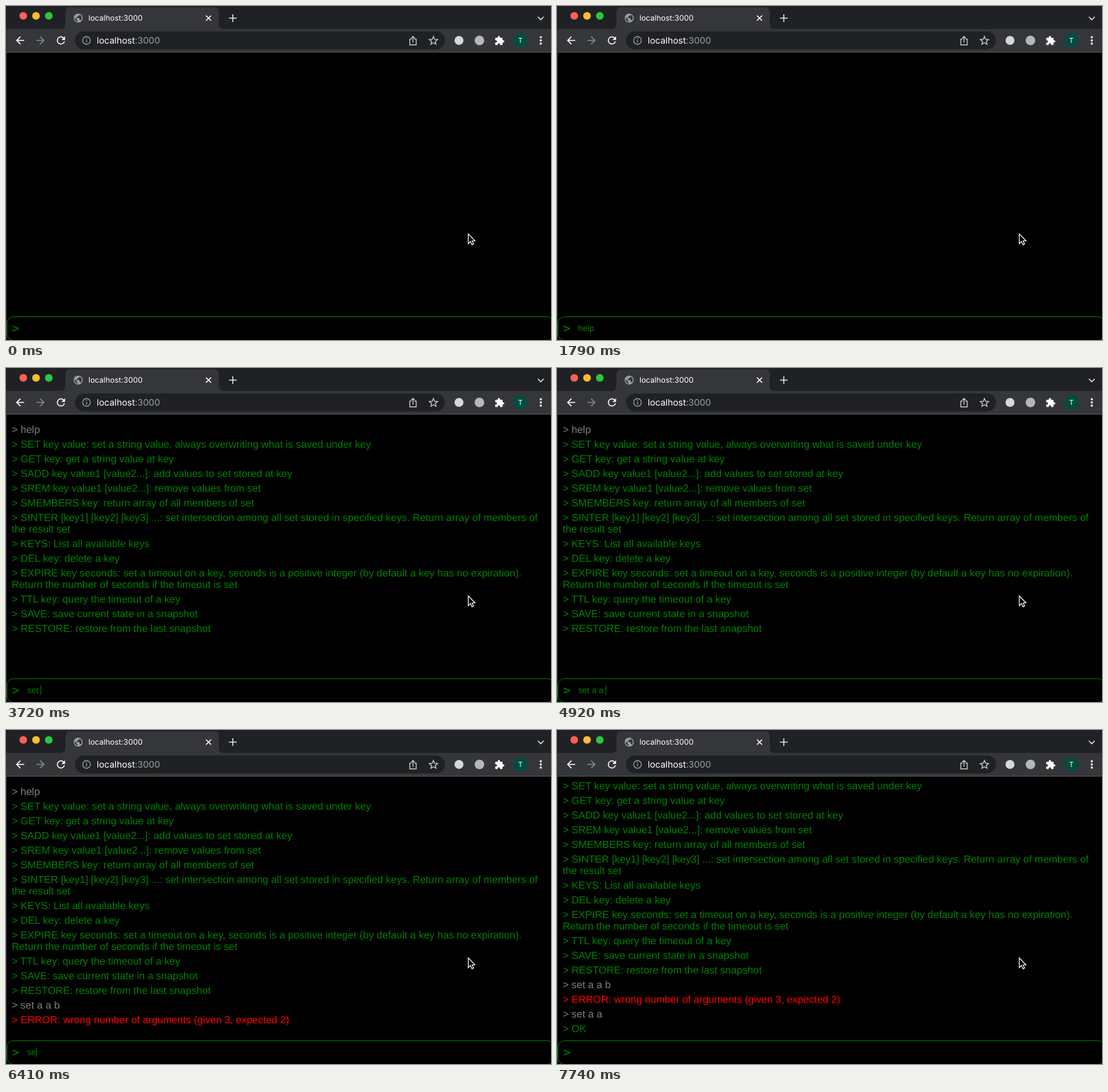
These frames come from a looping animation (853x524 px, 8000 ms). An HTML page:

```html
<!DOCTYPE html>
<html lang="en">
<head>
<meta charset="utf-8">
<title>localhost:3000</title>
<style>
  html, body { margin: 0; width: 100%; height: 100%; overflow: hidden; background: #000; }
  svg { display: block; width: 853px; height: 524px; }
  text { text-rendering: geometricPrecision; white-space: pre; }
  .ui { font-family: Inter, sans-serif; }
  .term { font-family: "Liberation Sans", Arial, sans-serif; font-size: 16px; }
  .line { fill: none; stroke-width: 1.6; }
</style>
</head>
<body>
<svg viewBox="0 0 853 524" xmlns="http://www.w3.org/2000/svg">
  <defs><clipPath id="page"><rect y="75" width="853" height="412"/></clipPath></defs>
  <rect width="853" height="524"/>

  <!-- tab strip -->
  <rect width="853" height="37" fill="#202124"/>
  <circle cx="27" cy="15.5" r="6" fill="#ff5f57"/>
  <circle cx="47" cy="15.5" r="6" fill="#febc2e"/>
  <circle cx="67" cy="15.5" r="6" fill="#28c840"/>
  <path d="M85 36q8 0 8-8V10q0-8 8-8H325q8 0 8 8V28q0 8 8 8z" fill="#35363a"/>
  <path transform="translate(104.6 10.6) scale(.7)" fill="#9aa0a6" d="M12 2C6.48 2 2 6.48 2 12s4.48 10 10 10 10-4.48 10-10S17.52 2 12 2zm-1 17.93c-3.95-.49-7-3.85-7-7.93 0-.62.08-1.21.21-1.79L9 15v1c0 1.1.9 2 2 2v1.93zm6.9-2.54c-.26-.81-1-1.39-1.9-1.39h-1v-3c0-.55-.45-1-1-1H8v-2h2c.55 0 1-.45 1-1V7h2c1.1 0 2-.9 2-2v-.41c2.93 1.19 5 4.06 5 7.41 0 2.08-.8 3.97-2.1 5.39z"/>
  <text class="ui" x="129" y="23" font-size="12" fill="#fff">localhost:3000</text>
  <path class="line" stroke="#fff" d="M313 15l8 8m0-8l-8 8"/>
  <path class="line" stroke="#dee1e6" d="M349 19h12m-6-6v12"/>
  <path class="line" stroke="#dee1e6" d="M832.5 17l4.5 4.5 4.5-4.5"/>

  <!-- toolbar -->
  <rect y="36" width="853" height="36" fill="#35363a"/>
  <rect y="72" width="853" height="1" fill="#55595a"/>
  <path id="back" transform="translate(12.4 44.4) scale(.8)" fill="#fff" d="M20 11H7.83l5.59-5.59L12 4l-8 8 8 8 1.41-1.41L7.83 13H20z"/>
  <path transform="translate(63.6 44.4) scale(-.8 .8)" fill="#86888a" d="M20 11H7.83l5.59-5.59L12 4l-8 8 8 8 1.41-1.41L7.83 13H20z"/>
  <path transform="translate(76.4 44.4) scale(.8)" fill="#fff" d="M17.65 6.35A7.96 7.96 0 0 0 12 4a8 8 0 1 0 7.73 10h-2.08A6 6 0 1 1 12 6c1.66 0 3.14.69 4.22 1.78L13 11h7V4z"/>
  <rect x="108" y="40" width="579" height="28" rx="14" fill="#202124"/>
  <g class="line" stroke="#9aa0a6">
    <circle cx="126" cy="54" r="6" stroke-width="1.3"/>
    <path stroke-width="1.4" d="M126 53.2v4m0-6.6v1.5"/>
  </g>
  <text class="ui" x="142" y="59" font-size="14" fill="#fff">localhost<tspan fill="#9aa0a6">:3000</tspan></text>
  <g class="line" stroke="#c4c7cb" style="stroke-width:1.4">
    <path d="M634.5 52H632v9h10v-9h-2.500M637 57.500v-9.500m-3 2.800l3-3 3 3"/>
    <path d="M669 47.800l1.800 4.300 4.700.4-3.600 3.100 1.100 4.500-4-2.400-4 2.400 1.100-4.500-3.600-3.100 4.700-.4z"/>
  </g>
  <circle cx="709" cy="54" r="7" fill="#d5d7da"/>
  <circle cx="741" cy="54" r="7.500" fill="#b5b7ba"/>
  <path transform="translate(764.3 46.3) scale(.68)" fill="#fff" d="M20.500 11H19V7c0-1.100-.9-2-2-2h-4V3.500a2.500 2.500 0 0 0-5 0V5H4c-1.100 0-1.990.9-1.990 2v3.800H3.500c1.490 0 2.700 1.210 2.700 2.700s-1.210 2.700-2.700 2.700H2V20c0 1.100.9 2 2 2h3.800v-1.500c0-1.490 1.210-2.700 2.700-2.700s2.700 1.210 2.700 2.700V22H17c1.100 0 2-.9 2-2v-4h1.500a2.500 2.500 0 0 0 0-5z"/>
  <circle cx="805" cy="54" r="11" fill="#004d40"/>
  <text class="ui" x="805" y="58" font-size="11" text-anchor="middle" fill="#fff">T</text>
  <g fill="#fff">
    <circle cx="837" cy="49" r="1.700"/>
    <circle cx="837" cy="54" r="1.700"/>
    <circle cx="837" cy="59" r="1.700"/>
  </g>

  <!-- terminal -->
  <rect y="73" width="1" height="451" fill="#3c3d3f"/>
  <g clip-path="url(#page)"><g id="log" class="term"></g></g>
  <rect x="1.500" y="487.500" width="856" height="37" rx="10" stroke="#008000" fill="#000"/>
  <text x="9.500" y="512" font-family="DejaVu Sans Mono, monospace" font-size="19" fill="#008000">&gt;</text>
  <text id="typed" class="term" x="33" y="510" style="font-size:13.333px" fill="#008000"></text>
  <rect id="caret" y="498" width="1" height="15" fill="#008000"/>
  <path d="M723.500 357.500V372.800L727 369.500 729.300 374.600 731.800 373.500 729.600 368.500H734z" fill="#000" stroke="#fff" stroke-width="1.200"/>
</svg>
<script>
const LOOP = 8000;
const $ = id => document.getElementById(id);
const GREEN = '#008000', GREY = '#808080', RED = '#ff0000';

// Each block appears at its time; '\n' marks a wrapped line.
const blocks = [
  [1930, GREY, 'help'],
  ...[
    'SET key value: set a string value, always overwriting what is saved under key',
    'GET key: get a string value at key',
    'SADD key value1 [value2...]: add values to set stored at key',
    'SREM key value1 [value2...]: remove values from set',
    'SMEMBERS key: return array of all members of set',
    'SINTER [key1] [key2] [key3] ...: set intersection among all set stored in specified keys. Return array of members of\nthe result set',
    'KEYS: List all available keys',
    'DEL key: delete a key',
    'EXPIRE key seconds: set a timeout on a key, seconds is a positive integer (by default a key has no expiration).\nReturn the number of seconds if the timeout is set',
    'TTL key: query the timeout of a key',
    'SAVE: save current state in a snapshot',
    'RESTORE: restore from the last snapshot'
  ].map(s => [1930, GREEN, s]),
  [5510, GREY, 'set a a b'],
  [5510, RED, 'ERROR: wrong number of arguments (given 3, expected 2)'],
  [7740, GREY, 'set a a'],
  [7740, GREEN, 'OK']
];

let y = 102;
const rows = [];
for (const [at, fill, str] of blocks) {
  ('> ' + str).split('\n').forEach((part, i) => {
    if (i) y += 18;
    const el = document.createElementNS('http://www.w3.org/2000/svg', 'text');
    el.setAttribute('x', 9);
    el.setAttribute('y', y);
    el.setAttribute('fill', fill);
    el.textContent = part;
    $('log').append(el);
    rows.push({ at, el });
  });
  y += 23;
}

// Input states: [time, text, caret visible]
const keys = (from, to, text, start = 1) => {
  const n = text.length - start;
  return Array.from({ length: n + 1 }, (_, i) =>
    [Math.round((from + (to - from) * i / n) / 10) * 10, text.slice(0, start + i), true]);
};
const input = [
  [0, '', false], [150, '', true], [600, '', false],
  ...keys(900, 1340, 'help'), [1790, 'help', false],
  [1930, '', false], [2230, '', true], [2830, '', false],
  ...keys(3270, 3870, 'set a'), [4170, 'set a ', true], [4470, 'set a a', true],
  ...keys(4920, 5060, 'set a a b', 8), [5510, '', false],
  ...keys(6110, 6990, 'set a ', 0), [7290, 'set a a', true],
  [7740, '', false]
];

function draw(t) {
  for (const { at, el } of rows) el.setAttribute('visibility', t >= at ? 'visible' : 'hidden');
  $('log').setAttribute('transform', `translate(0 ${t >= 7740 ? -32 : 0})`);
  const [, text, on] = input.filter(s => s[0] <= t).pop();
  const typed = $('typed');
  typed.textContent = text.replace(/ /g, '\u00a0');
  const w = text ? typed.getComputedTextLength() : 0;
  $('caret').setAttribute('x', Math.floor(33 + w));
  $('caret').setAttribute('visibility', on ? 'visible' : 'hidden');
}

const begin = performance.now();
function tick() {
  draw((performance.now() - begin) % LOOP);
  requestAnimationFrame(tick);
}
draw(0);
requestAnimationFrame(tick);
</script>
</body>
</html>
```
